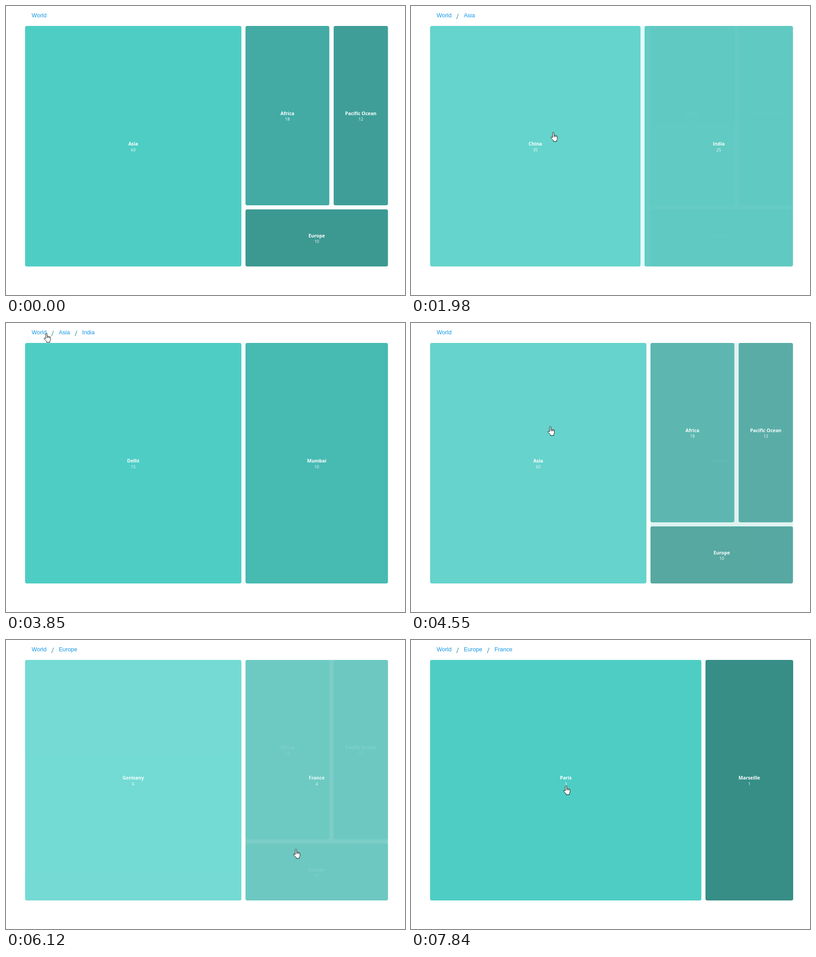
Recreate the animation shown at these times as an HTML page. Size 878 by 638 pixels, loop 8000 ms.

```html
<!DOCTYPE html>
<html lang="en">
<head>
<meta charset="utf-8">
<title>Treemap drill-down</title>
<style>
  html, body { margin: 0; width: 100%; height: 100%; overflow: hidden; background: #fff; }
  svg { display: block; }
  .name { font: bold 10.3px "Open Sans", sans-serif; fill: #fff; text-anchor: middle; }
  .value { font: 9px "Open Sans", sans-serif; fill: #fff; text-anchor: middle; }
  #crumbs { font: 12.6px "Liberation Sans", Arial, sans-serif; fill: #1296e6; }
  .slash { font: 16px "Open Sans", sans-serif; fill: #4098a8; }
</style>
</head>
<body>
<svg width="878" height="638" viewBox="0 0 878 638">
  <g id="views"></g>
  <text id="crumbs" x="56.5" y="25"></text>
  <g id="cursor" fill="#fff" stroke="#111" stroke-linejoin="round">
    <g id="hand">
      <path d="M4.5 12V2q0-1.6 1.5-1.6T7.5 2V7q1.3-1 2.6.4 1.4-.8 2.5.7 2.4-.4 2.4 1.8V14q0 2-1.5 4V20.5H6.5V18.5L1 13Q.2 11 2 11Z"/>
      <path d="M7.5 7v4M10 7.5V11M12.5 8v3" fill="none"/>
    </g>
    <path id="arrow" d="M.5.5V17l4-4 3 6 2.5-1.2L7.300 12H12Z"/>
  </g>
</svg>
<script>
const LOOP = 8000, FIRST = 260, STEP = 142.9;
const BRIGHTEN = 400, FADE = 550, GLOW = 0.225;
const $ = id => document.getElementById(id);

// Tiles: name, value, left, top, right, bottom, colour
const LIGHT = '#4ecdc4', MID = '#47bab2';
const pair = (a, b, split, dark, end = 840.5) => [
  [...a, 42, 44, split, 575, LIGHT],
  [...b, split + 9, 44, end, 575, dark]
];
const views = {
  World: [
    ['Asia', 60, 42, 44, 518, 575, LIGHT],
    ['Africa', 18, 527, 44, 711.5, 440, '#43aba4'],
    ['Pacific Ocean', 12, 721, 44, 840.5, 440, '#3f9f98'],
    ['Europe', 10, 527, 449, 840.5, 575, '#3c9992']
  ],
  Asia: pair(['China', 35], ['India', 25], 505, '#49c2b9'),
  India: pair(['Delhi', 15], ['Mumbai', 10], 518, MID),
  Europe: pair(['Germany', 6], ['France', 4], 518, MID),
  France: pair(['Paris', 3], ['Marseille', 1], 639, '#368e87', 841)
};

const tile = ([name, value, l, t, r, b, fill]) => {
  const x = (l + r) / 2, y = (t + b) / 2;
  return `<rect x="${l}" y="${t}" width="${r - l}" height="${b - t}" rx="4" fill="${fill}"/>
    <text class="name" x="${x}" y="${y - 1.5}">${name}</text>
    <text class="value" x="${x}" y="${y + 11.3}">${value}</text>`;
};
$('views').innerHTML = Object.entries(views)
  .map(([id, tiles]) => `<g id="${id}">${tiles.map(tile).join('')}</g>`).join('');

// Clicks: time, breadcrumb trail, delay before the cross-fade
const clicks = [
  [-2000, ['World'], 0],
  [1110, ['World', 'Asia'], BRIGHTEN],
  [2850, ['World', 'Asia', 'India'], BRIGHTEN],
  [4090, ['World'], 0],
  [5330, ['World', 'Europe'], BRIGHTEN],
  [6830, ['World', 'Europe', 'France'], BRIGHTEN]
];

// Cursor stops: time, x, y
const stops = [
  [260, 788, 594], [840, 307, 278.500], [2140, 307, 278.500], [2720, 531, 297.500],
  [3400, 531, 297.500], [3850, 81, 21], [4150, 81, 21], [4540, 300.500, 228],
  [4690, 300.500, 228], [5250, 632, 461.500], [6200, 632, 461.500],
  [6760, 604.500, 372.500], [7400, 604.500, 372.500], [7820, 335, 321]
];

const clamp = v => Math.min(1, Math.max(0, v));
const ease = p => p * p * (3 - 2 * p);
const slash = '<tspan class="slash" dx="10.3" dy="3.5">/</tspan>';

function drawViews(t) {
  const index = clicks.findLastIndex(c => c[0] <= t);
  const [start, trail, delay] = clicks[index];
  const from = index ? clicks[index - 1][1].at(-1) : null;
  const to = trail.at(-1);
  const p = clamp((t - start - delay) / FADE);
  const glow = delay ? 1 + GLOW * clamp((t - start) / delay) : 1;
  for (const id in views) {
    const alpha = id === to ? p : id === from ? 1 - p : 0;
    const { style } = $(id);
    style.display = alpha ? '' : 'none';
    style.opacity = alpha;
    style.filter = id === from && glow > 1 ? `brightness(${glow})` : 'none';
  }
  if (from) $('views').append($(from), $(to));
  $('crumbs').innerHTML = trail
    .map((name, i) => i ? `${slash}<tspan dx="10.8" dy="-3.5">${name}</tspan>` : name).join('');
}

function drawCursor(t) {
  $('cursor').style.display = t < stops[0][0] ? 'none' : '';
  const i = Math.max(0, stops.findLastIndex(s => s[0] <= t));
  const a = stops[i], b = stops[i + 1] || a;
  const p = ease(clamp((t - a[0]) / (b[0] - a[0] || 1)));
  const x = a[1] + (b[1] - a[1]) * p, y = a[2] + (b[2] - a[2]) * p;
  $('cursor').setAttribute('transform', `translate(${x} ${y})`);
  $('hand').style.display = y > 575 ? 'none' : '';
  $('arrow').style.display = y > 575 ? '' : 'none';
}

function frame(now) {
  const t = now % LOOP;
  const held = t < FIRST ? 0 : FIRST + Math.floor((t - FIRST) / STEP) * STEP;
  drawViews(held);
  drawCursor(held);
  requestAnimationFrame(frame);
}
frame(performance.now());
</script>
</body>
</html>
```
